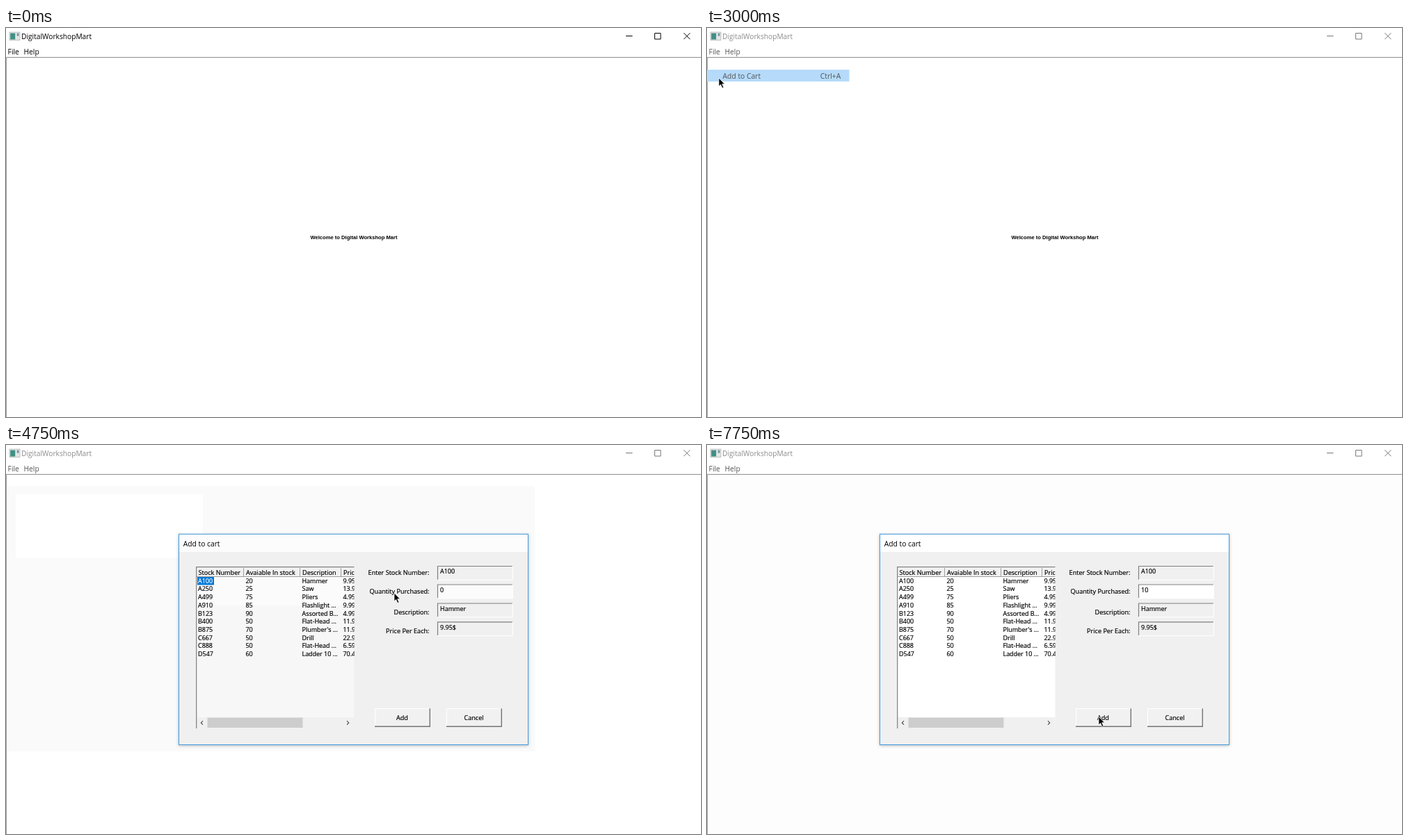
These frames come from a looping animation (999x560 px, 8 s). An HTML page:

```html
<!DOCTYPE html>
<html lang="en">
<head>
<meta charset="utf-8">
<title>DigitalWorkshopMart</title>
<style>
html, body { margin: 0; width: 100%; height: 100%; overflow: hidden; background: #fff; }
svg { display: block; width: 999px; height: 560px; }
text { font-family: "Open Sans", "Noto Sans", sans-serif; white-space: pre; }
.form text { stroke: #000; stroke-width: .2px; }
.form text.picked { stroke: #fff; }
</style>
</head>
<body>
<svg id="stage" viewBox="0 0 999 560" xmlns="http://www.w3.org/2000/svg"></svg>
<script>
const LOOP = 8000, STEP = 250;
const stage = document.getElementById('stage');

const rect = (x, y, w, h, fill, more = '') =>
  `<rect x="${x}" y="${y}" width="${w}" height="${h}" fill="${fill}" ${more}/>`;
const text = (x, y, s, size, fill = '#000', more = '') =>
  `<text x="${x}" y="${y}" font-size="${size}" fill="${fill}" ${more}>${s}</text>`;
const path = (d, stroke, width = 1) =>
  `<path d="${d}" fill="none" stroke="${stroke}" stroke-width="${width}"/>`;
const END = 'text-anchor="end"', MID = 'text-anchor="middle"';

const MENU = [
  ['View Inventory', 'Ctrl+S', 52], ['Add to Cart', 'Ctrl+A', 69.4],
  ['Remove from Cart', 'Ctrl+R', 86.6], ['Display Contents of Cart', 'Ctrl+D', 103.9],
  ['Checkout', 'Ctrl+O', 121], ['Exit', '', 141.3]
];

const STOCK = [
  ['A100', 20, 'Hammer', '9.95$'], ['A250', 25, 'Saw', '13.95$'],
  ['A499', 75, 'Pliers', '4.95$'], ['A910', 85, 'Flashlight ...', '9.99$'],
  ['B123', 90, 'Assorted B...', '4.99$'], ['B400', 50, 'Flat-Head ...', '11.95$'],
  ['B875', 70, "Plumber's ...", '11.99$'], ['C667', 50, 'Drill', '22.95$'],
  ['C888', 50, 'Flat-Head ...', '6.59$'], ['D547', 60, 'Ladder 10 ...', '70.49$']
];
const COLUMNS = [276, 344.5, 425.5, 484.5];

// [time, x, y] of the pointer tip; it jumps from one place to the next
const POINTER = [
  [1000, 5, 37], [1250, 8, 41], [1500, 10, 44], [2250, 11, 52], [2500, 11, 64],
  [2750, 17, 72], [3750, 272, 147], [4000, 284, 192], [4500, 420, 205],
  [4750, 558, 213], [5000, 610, 221], [5250, 632, 212],
  [7000, 622, 262], [7250, 588, 345], [7500, 566, 386], [7750, 563, 391]
];
const QUANTITY = [[0, '0'], [6000, ''], [6250, '1'], [6750, '10']];

const at = (keys, t) => keys.filter(k => k[0] <= t).pop();

function appWindow(t) {
  const active = t < 3000, ink = active ? '#000' : '#8c8c8c';
  const menuInk = active ? '#000' : '#555', open = t >= 2000 && active;
  const sign = active ? '#000' : '#777';
  return rect(0, 0, 999, 560, '#fff') +
    rect(0, 43, 999, 517, t < 7000 ? '#fff' : '#fdfdfd') +
    rect(5, 6, 15, 11.5, '#e4e6e6', 'stroke="#a9adad" stroke-width=".7"') +
    rect(6.2, 7.5, 7, 9, '#3f8f83') + rect(15.8, 7.5, 2.6, 4, '#6f8f9d') +
    text(22, 15.8, 'DigitalWorkshopMart', 10.2, ink) +
    path('M891 11.5h9.5M932.5 7.5h8.5v8.5h-8.5zM974.3 7.2l9 9M983.3 7.2l-9 9', sign) +
    (open ? rect(0, 24, 208, 18, '#f5f5f5') + rect(0, 24.5, 22, 17, '#cce8ff') : '') +
    text(2.6, 37.6, 'File', 10.3, menuInk) + text(25.5, 37.6, 'Help', 10.3, menuInk) +
    rect(0, 41.8, 999, 1.2, '#999') + rect(0, 42, 1, 518, '#999') +
    text(500, 304, 'Welcome to Digital Workshop Mart', 7.6, '#000',
      `${MID} font-weight="700" style="font-family:'Liberation Sans',Arial,sans-serif"`);
}

function menuItem([label, keys, y], ink) {
  return text(22.5, y + 3.8, label, 10.35, ink) + text(192.3, y + 3.8, keys, 10.35, ink, END);
}

function menu(t) {
  if (t < 2000 || t >= 3250) return '';
  if (t >= 3000) return rect(0, 60, 204.5, 17, '#b5dafa') + menuItem(MENU[1], '#555');
  const picked = t >= 2750 ? 1 : t >= 2250 ? 0 : -1;
  return rect(1, 44, 207, 109, '#000', 'opacity=".12"') +
    rect(.5, 43, 205.5, 107.5, '#f2f2f2', 'stroke="#a5a5a5"') +
    (picked < 0 ? '' : rect(1, 43.3 + picked * 17.1, 204, 17, '#91c9f7')) +
    rect(22, 130.3, 180, 1, '#d9d9d9') +
    MENU.map(item => menuItem(item, '#000')).join('');
}

function stockList(t) {
  const stale = t >= 3750 && t < 7000;
  const tone = stale ? '#f7f7f7' : t < 7000 ? '#fafafa' : '#fff';
  const top = stale ? '#fbfbfb' : tone;
  const picked = t >= 4250 && t < 5250;
  const heads = ['Stock Number', 'Avaiable In stock', 'Description', 'Price'];
  const cell = (s, x, y, lit) =>
    text(x, y, s, 8.95, lit ? '#fff' : '#000', lit ? 'class="picked"' : '');
  const row = (cells, i) => cells.map((s, c) =>
    cell(s, COLUMNS[c], 198.6 + i * 11.73, picked && !i && !c)).join('');
  return `<g clip-path="url(#list)">` +
    rect(273, 175, 228, 233, tone) + rect(274, 189, 227, 42, top) +
    rect(274, 177, 227, 12, '#f1f1f1') +
    path('M341.5 177v12M422.5 177v12M481.5 177v12M274 189.5h227', '#a0a0a0') +
    heads.map((s, i) => text(COLUMNS[i] + .5, 186.5, s, 9.1)).join('') +
    (picked ? rect(275, 190, 24, 11.5, '#0078d7') : '') +
    STOCK.map(row).join('') +
    rect(274, 392, 227, 16, '#f0f0f0') + rect(289.5, 392.5, 137, 14.5, '#cdcdcd') +
    path('M283 397.2l-2.7 2.7 2.7 2.7M490 397.2l2.7 2.7-2.7 2.7', '#444', 1.1) +
    path('M273.7 408V175.7H501', '#7d7d7d', 1.2) + '</g>';
}

function field(y, label, labelY, value, fill) {
  return text(608.5, labelY, label, 9.1, '#000', END) +
    rect(620, y, 108.5, 20.5, fill) +
    path(`M620.5 ${y + 20}V${y + .5}H728`, '#808080', 1.2) +
    path(`M620 ${y + 20.3}H728.3V${y}`, '#fff') +
    text(624, y + 11.3, value, 9);
}

function button(x, label, focus) {
  return rect(x, 379, 80, 27, '#f1f1f1') +
    path(`M${x + .5} 405.5v-26h79`, focus ? '#777' : '#fff') +
    path(`M${x} 405.3h79.3v-26`, focus ? '#606060' : '#747474', 1.4) +
    text(x + 39.5, 395.8, label, 9.1, '#000', MID);
}

function dialog(t) {
  if (t < 3250) return '';
  const filled = t >= 4250, fresh = t >= 7000;
  const qty = at(QUANTITY, t)[1];
  const caret = t >= 5250 && t < 7000;
  const patches = fresh ? '' : rect(1, 59.5, 759, 381.5, '#fafafa') +
    (t >= 3750 ? rect(14, 71, 269, 92, '#fff') : '');
  return patches +
    rect(248, 128, 503, 304, '#fff', 'filter="url(#shade)"') +
    rect(248, 128, 503, 304, '#f0f0f0') +
    rect(248, 128, 503, 26, fresh ? '#fff' : '#fcfcfc') +
    rect(248.5, 128.3, 502, 303.2, 'none', 'stroke="#3f9ae0"') +
    text(254.7, 145.8, 'Add to cart', 10.3) +
    '<g class="form">' + stockList(t) +
    field(174, 'Enter Stock Number:', 187.3, filled ? 'A100' : '', '#f0f0f0') +
    field(200.5, 'Quantity Purchased:', 214.3, qty, fresh ? '#fff' : '#fbfbfb') +
    field(227.5, 'Description:', 243.8, filled ? 'Hammer' : '', '#f0f0f0') +
    field(254.3, 'Price Per Each:', 270.8, filled ? '9.95$' : '', '#f0f0f0') +
    (caret ? rect(624 + qty.length * 5.1, 202.5, .8, 11, '#333') : '') +
    button(530, 'Add', false) + button(633, 'Cancel', !filled) + '</g>';
}

function pointer(t) {
  const key = at(POINTER, t);
  return key ? `<path transform="translate(${key[1]} ${key[2]})" fill="#000" stroke="#fff" stroke-width=".7"
    d="M0 0v11.8l2.7-2.4 2.2 5 2-.9-2.2-4.8h3.7z"/>` : '';
}

const DEFS = `<defs><clipPath id="list"><rect x="273" y="175" width="227.5" height="233"/></clipPath>
  <filter id="shade" x="-5%" y="-5%" width="110%" height="112%">
  <feDropShadow dx="0" dy="1" stdDeviation="2.2" flood-color="#000" flood-opacity=".26"/></filter></defs>`;

let shown = -1;
function draw(now) {
  const t = Math.floor(now % LOOP / STEP) * STEP;
  if (t !== shown) {
    shown = t;
    stage.innerHTML = DEFS + appWindow(t) + menu(t) + dialog(t) + pointer(t);
  }
  requestAnimationFrame(draw);
}
draw(performance.now());
</script>
</body>
</html>
```
